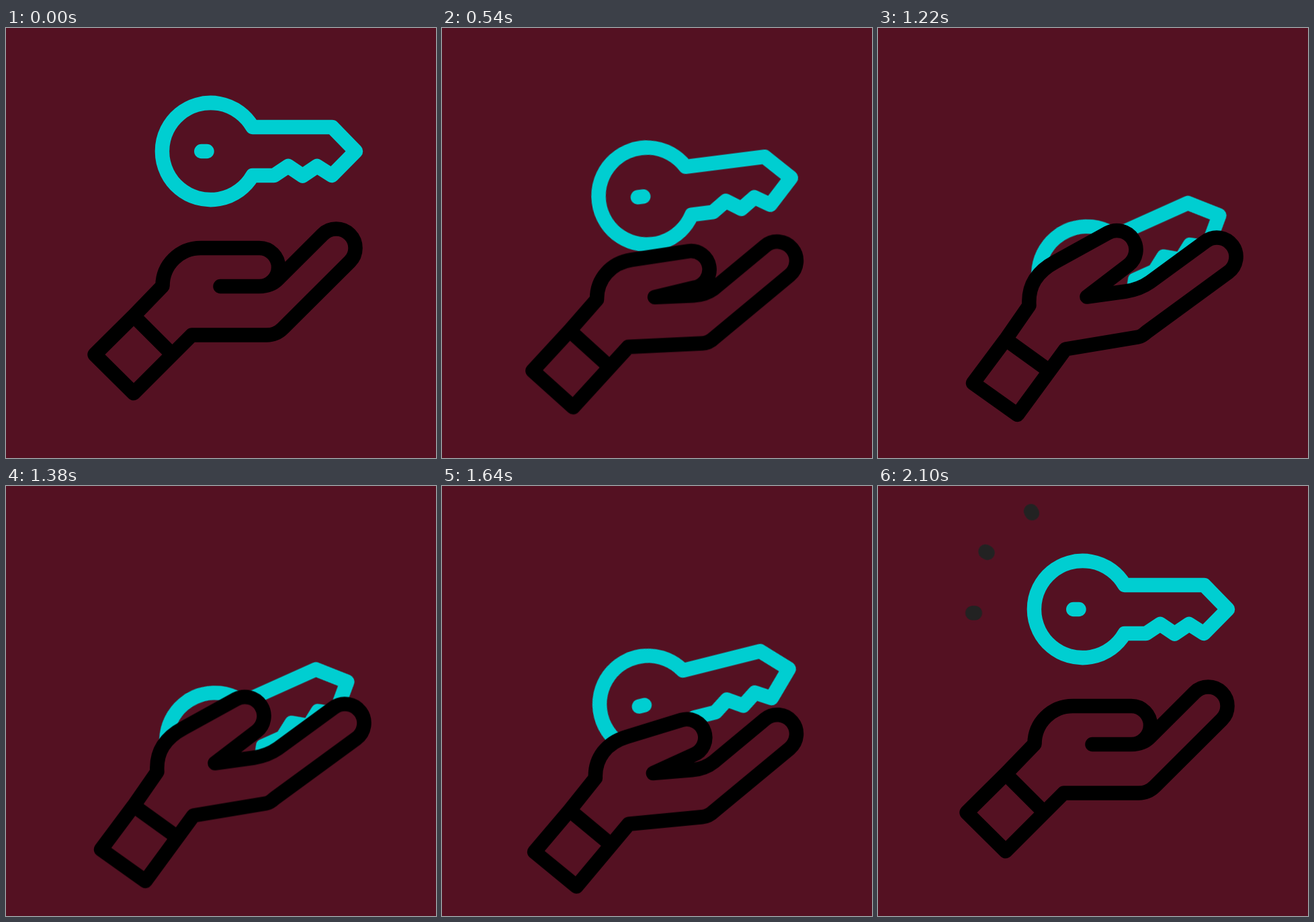
These frames come from a looping animation (640 px wide and 640 px high, 2.42 s). An HTML page without scripts:

```html
<!DOCTYPE html>
<html lang="en">
<head>
<meta charset="utf-8">
<title>Key in hand</title>
<style>
  :root {
    --bg: #541122;
    --rest: path("M190 428.5L233 384C233 352.5 258.5 327.5 290 327.5L377 327.5C392.7 327.5 405.5 340.3 405.5 356C405.5 371.7 392.7 384.5 377 384.5L319 384.5L377 384.5C387 384.5 397 381.5 404 374.5L471.3 307.3C482.4 296.2 500.5 296.2 511.7 307.3C522.8 318.5 522.8 336.6 511.7 347.7L412 447C406 453 397 457 388 457L276.5 457L190 543.5L132 486ZM190 428.5L247.5 486");
    --wide: path("M190 452L227.6 403.4C226.3 373.6 243.4 351.3 272.6 341.2L353.9 312.4C367.5 307.7 382.6 314.6 388 328.2C393.4 341.7 387.3 357.2 374.2 363.2L313.6 394.9L371.6 389.5C383.7 388.1 395.7 383.8 405.3 379.1L492.6 320.6C505.8 311.8 523.5 315.4 532.2 328.6C541 341.8 537.4 359.5 524.2 368.2L396.4 453.8C394 456 391 458.5 387.3 459L278.2 471.1L201.7 564.9L138.4 514.5ZM190 452L252.2 502");
    --cupped: path("M190 463.5L225 413C223 384 236 363 264 348L342 305C355.1 297.9 371.3 302 379.4 314.5C387.5 327 384.6 343.7 372.8 352.7L311 400L369 392C382 390 395 385 405 378L487.7 317.5C500.4 308.2 518.2 311 527.5 323.7C536.8 336.4 534 354.2 521.3 363.5L400 452.2C397 455 393 459 387 460L279 478L207.5 575.5L141.5 528.5ZM190 463.5L254.5 510");
  }
  html, body { margin: 0; width: 100%; height: 100%; overflow: hidden; background: var(--bg); }
  svg { display: block; width: 100%; height: 100%; }
  path { stroke-width: 21.5; stroke-linecap: round; stroke-linejoin: round; }

  .key, .arm, .hand, .dot { animation: 2420ms linear infinite; }
  .key { fill: none; stroke: #00ced1; transform-origin: 376.5px 183.5px; animation-name: key; }
  .arm { animation-name: arm; }
  .hand { fill: var(--bg); stroke: #000; d: var(--rest); animation-name: hand; }
  .dot { fill: none; animation-name: fly, tint, show; }

  /* fall, lift, dip, toss */
  @keyframes key {
    0%, 9.091% { transform: translateY(0) rotate(0deg); animation-timing-function: cubic-bezier(.333, 0, .667, 0); }
    28.926% { transform: translateY(192.5px) rotate(-24.2deg); animation-timing-function: cubic-bezier(.35, 0, .25, 1); }
    38.843%, 50.413% { transform: translateY(154.5px) rotate(-24.2deg); animation-timing-function: cubic-bezier(.6, 0, .83, .83); }
    64.256% { transform: translateY(212.5px) rotate(-24.2deg); animation-timing-function: cubic-bezier(.2, 0, 0, 1); }
    85.124%, 100% { transform: translateY(0) rotate(0deg); }
  }
  @keyframes arm {
    0%, 9.091% { transform: translateY(0); animation-timing-function: cubic-bezier(.333, 0, .667, 0); }
    28.926% { transform: translateY(38px); animation-timing-function: cubic-bezier(.35, 0, .25, 1); }
    38.843%, 50.413% { transform: translateY(0); animation-timing-function: cubic-bezier(.6, 0, .83, .83); }
    64.256% { transform: translateY(58px); animation-timing-function: cubic-bezier(.2, 0, 0, 1); }
    85.124%, 100% { transform: translateY(0); }
  }
  @keyframes hand {
    0%, 9.091% { d: var(--rest); animation-timing-function: cubic-bezier(.333, 0, .667, 0); }
    26.446% { d: var(--wide); }
    29.339%, 64.256% { d: var(--cupped); animation-timing-function: cubic-bezier(.2, 0, 0, 1); }
    85.124%, 100% { d: var(--rest); }
  }
  @keyframes fly {
    0%, 72.314% { transform: translateX(-60px); d: path("M-4.7 0H4.7"); animation-timing-function: cubic-bezier(.2, 0, 0, 1); }
    86.777%, 100% { transform: translateX(0); d: path("M-1.75 0H1.75"); }
  }
  @keyframes tint {
    0%, 72.727% { stroke: #f0ffff; }
    74.38% { stroke: #d8f6f6; }
    86.777%, 100% { stroke: #222; }
  }
  @keyframes show {
    0% { opacity: 0; animation-timing-function: step-end; }
    72.727%, 100% { opacity: 1; }
  }
</style>
</head>
<body>
<svg viewBox="0 0 640 640">
  <g transform="translate(142.5 189) rotate(180)"><path class="dot" d="M-1.75 0H1.75"/></g>
  <g transform="translate(161.5 98.5) rotate(211.9)"><path class="dot" d="M-1.75 0H1.75"/></g>
  <g transform="translate(228.5 39) rotate(241.2)"><path class="dot" d="M-1.75 0H1.75"/></g>
  <g class="key">
    <path d="M367 147.5H485.5L520.5 183.5L485 219.5L463 205.5L441.5 220L420 205.5L399 219.5H367A72.1 72.1 0 1 1 367 147.5Z"/>
    <path d="M290.8 183.5H299"/>
  </g>
  <g class="arm"><path class="hand"/></g>
</svg>
</body>
</html>
```
